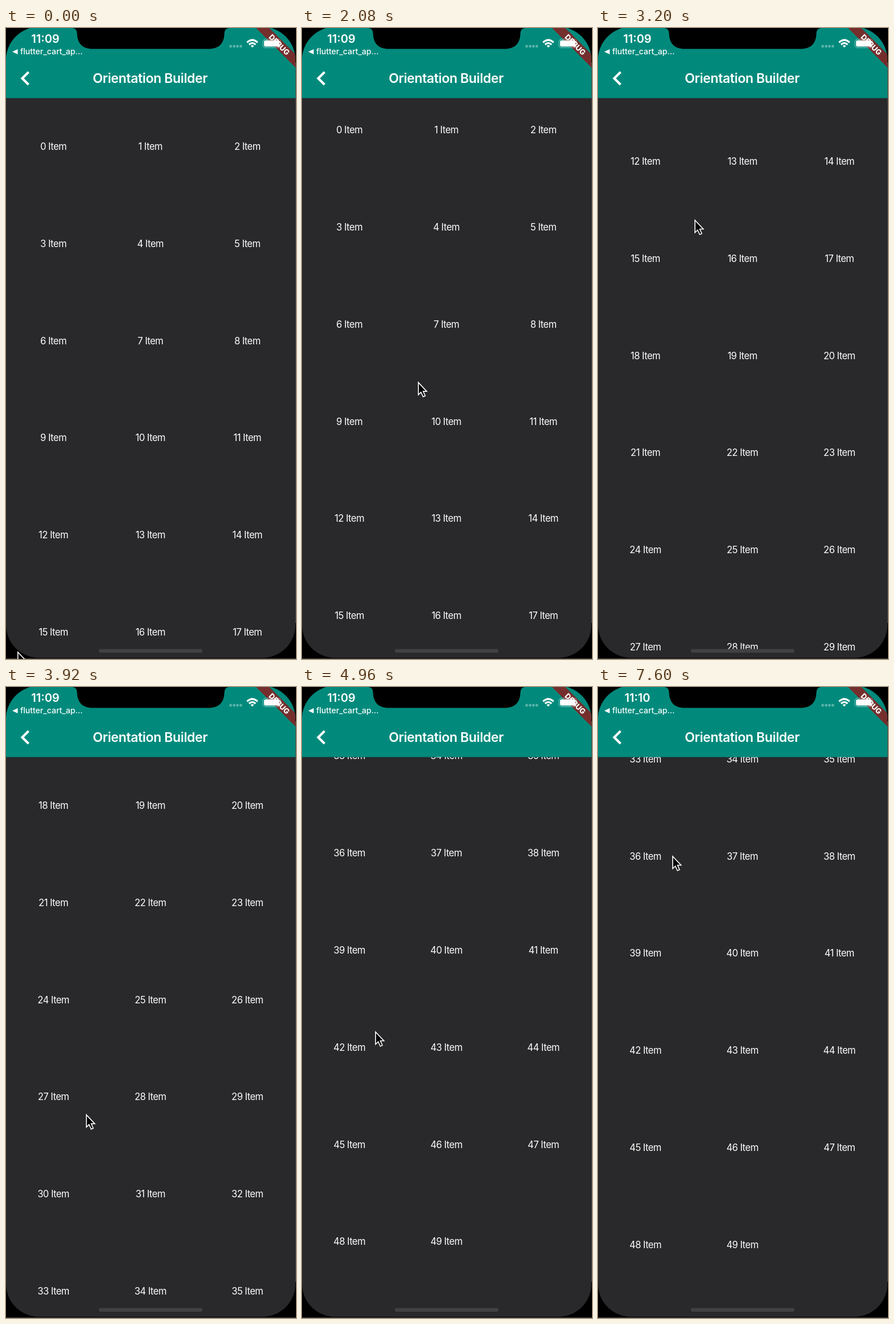
These frames come from a looping animation (508 by 1103 pixels, 7680 ms). An HTML page:

```html
<!DOCTYPE html>
<html lang="en">
<head>
<meta charset="utf-8">
<title>Orientation Builder</title>
<style>
  html, body { margin: 0; width: 100%; height: 100%; overflow: hidden; background: #000; }
  svg { display: block; width: 100%; height: 100%; }
  text { font-family: Inter, Roboto, sans-serif; fill: #fff; }
  #items text { font-size: 16.6px; letter-spacing: -.55px; text-anchor: middle; }
  .middle { text-anchor: middle; }
</style>
</head>
<body>
<svg viewBox="0 0 508 1103">
  <defs>
    <clipPath id="screen"><rect y="-2" width="507" height="1103" rx="58"/></clipPath>
  </defs>
  <rect width="508" height="1103"/>
  <path d="M0 1102.5H508M507.5 60V1040" stroke="#48484a"/>
  <g clip-path="url(#screen)">
    <rect width="508" height="1103" fill="#29282a"/>
    <g id="items"></g>
    <rect width="508" height="122.5" fill="#018a7c"/>
    <rect x="162.500" y="1085.500" width="181.500" height="6.500" rx="3.250" fill="#414042"/>
    <path d="M116 0Q124 0 124.500 10C125 27 134 36.500 152 36.500H355C373 36.500 382 27 382.500 10Q383 0 391 0Z"/>
    <g transform="translate(508 0) rotate(45)">
      <rect x="-56" y="33" width="112" height="16.500" fill="#742e2c"/>
    </g>
  </g>

  <text id="clock" class="middle" x="69" y="25.500" font-size="20" font-weight="600">11:09</text>
  <path d="M11 41.500L20.500 37V46Z" fill="#fff"/>
  <text x="25" y="46" font-size="14" font-weight="500">flutter_cart_ap...</text>
  <g fill="#fff" opacity=".35">
    <circle cx="393.500" cy="32" r="2.400"/><circle cx="399.700" cy="32" r="2.400"/>
    <circle cx="405.500" cy="32" r="2.400"/><circle cx="411.300" cy="32" r="2.400"/>
  </g>
  <g fill="none" stroke="#fff" stroke-width="3.200">
    <path d="M422.300 25.300Q431.500 16.800 440.700 25.300M425.800 29Q431.500 23.800 437.200 29"/>
    <path d="M428.600 31.200Q431.500 28.800 434.400 31.200L431.500 34.300Z" fill="#fff" stroke="none"/>
  </g>
  <rect x="450" y="19.500" width="31" height="15" rx="4.500" fill="none" stroke="#fff" stroke-opacity=".5"/>
  <rect x="452" y="21.500" width="27" height="11" rx="2.800" fill="#fff"/>
  <text class="middle" transform="translate(508 0) rotate(45)" y="46" font-size="13" font-weight="800">DEBUG</text>
  <path d="M39.500 77L28.500 88L39.500 99" fill="none" stroke="#fff" stroke-width="4.200"/>
  <text class="middle" x="252.500" y="96.300" font-size="23" font-weight="600" letter-spacing="-.4">Orientation Builder</text>
  <path id="cursor" d="M.8 1V22.500L5.500 18L9.200 26L12.800 24.400L9.300 16.500H15.500Z" stroke="#fff" stroke-width="1.600"/>
</svg>
<script>
const LOOP = 7680, PITCH = 169.8, CLOCK_TICK = 6800;
const $ = id => document.getElementById(id);
const items = $('items'), cursor = $('cursor'), clock = $('clock');

for (let i = 0; i < 50; i++) {
  const label = document.createElementNS('http://www.w3.org/2000/svg', 'text');
  label.setAttribute('x', 83 + i % 3 * 169.9);
  label.setAttribute('y', 213 + Math.floor(i / 3) * PITCH);
  label.textContent = i + ' Item';
  items.append(label);
}

// Drags, flings and the bounce at the end of the list: [time, offset]
const scrollKeys = [
  [0, 0], [1960, 0], [2080, 28.4], [2400, 312], [2700, 495], [3200, 653],
  [3680, 728], [3740, 745], [3920, 1017.5], [4060, 1175], [4300, 1500],
  [4600, 1830], [4780, 1955], [4840, 1962], [4960, 1954.5], [5220, 1949],
  [5420, 2079], [5500, 2045], [5600, 1991], [5760, 1959.3], [5950, 1951],
  [6300, 1949], [LOOP, 1949]
];
// [time, x, y]
const cursorKeys = [
  [0, 20, 1090], [500, 20, 1090], [1900, 203, 647], [1960, 203, 647],
  [2080, 203, 619], [2400, 169, 335], [3200, 169, 335], [3650, 140, 1030],
  [3700, 140, 1030], [3920, 140, 748], [4060, 128, 602], [4960, 128, 602],
  [5180, 130, 975], [5220, 130, 975], [5440, 130, 295], [LOOP, 130, 295]
];

// Monotone cubic interpolation of column c
function sample(keys, t, c) {
  const slope = i => i < 0 || i > keys.length - 2 ? 0
    : (keys[i + 1][c] - keys[i][c]) / (keys[i + 1][0] - keys[i][0]);
  const tangent = i => {
    const a = slope(i - 1), b = slope(i);
    return a * b > 0 ? 2 * a * b / (a + b) : 0;
  };
  let i = 0;
  while (i < keys.length - 2 && t >= keys[i + 1][0]) i++;
  const h = keys[i + 1][0] - keys[i][0], u = (t - keys[i][0]) / h, v = 1 - u;
  return v * v * (1 + 2 * u) * keys[i][c] + u * u * (3 - 2 * u) * keys[i + 1][c]
    + h * u * v * (v * tangent(i) - u * tangent(i + 1));
}

function draw() {
  const t = performance.now() % LOOP;
  items.setAttribute('transform', `translate(0 ${-sample(scrollKeys, t, 1)})`);
  cursor.setAttribute('transform',
    `translate(${sample(cursorKeys, t, 1)} ${sample(cursorKeys, t, 2)})`);
  clock.textContent = t < CLOCK_TICK ? '11:09' : '11:10';
  requestAnimationFrame(draw);
}
draw();
</script>
</body>
</html>
```
